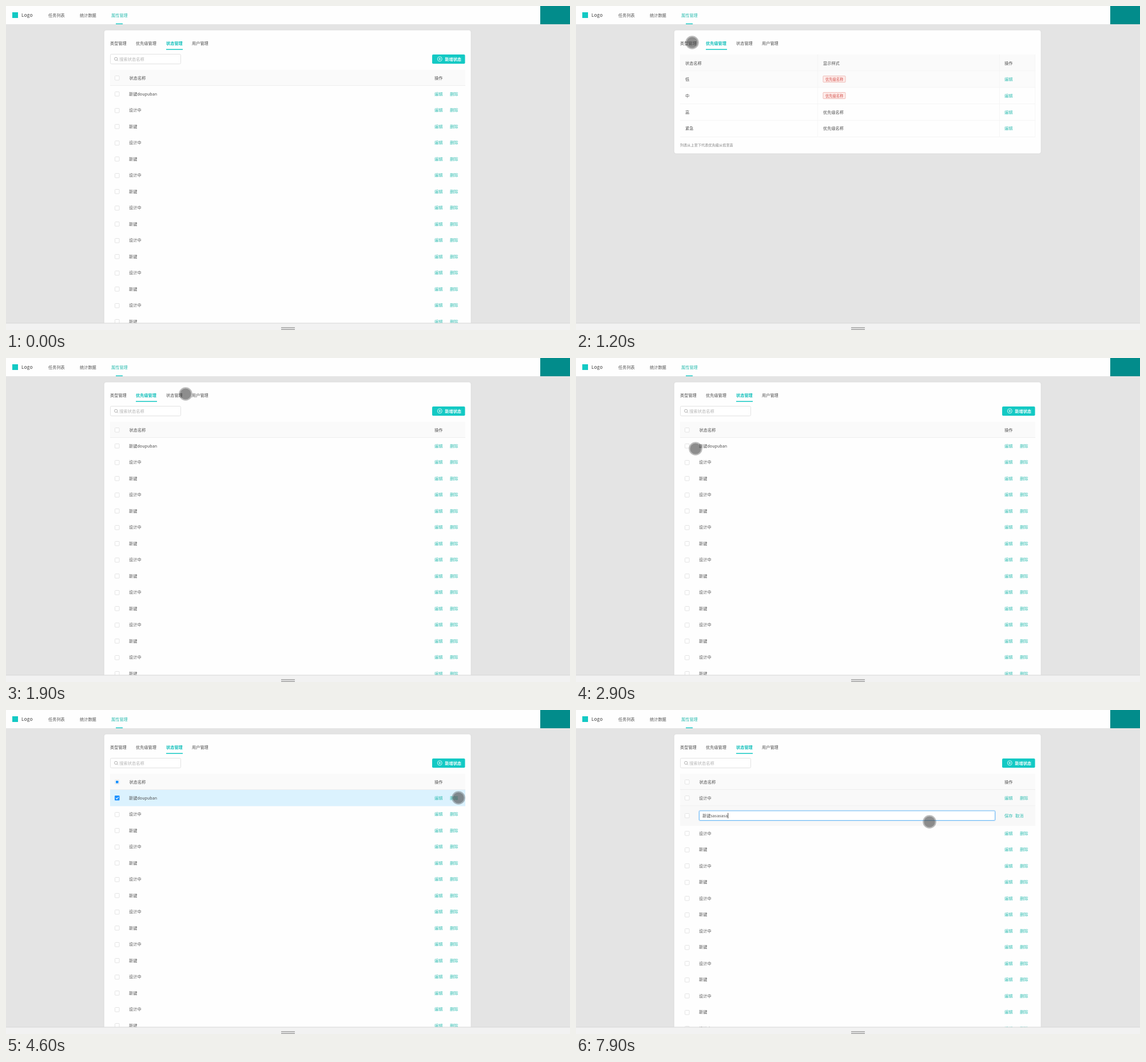
Animation of 986x568 px, one loop 8000 ms. Source, as an HTML page with a canvas:

```html
<!DOCTYPE html>
<html lang="zh-CN">
<head>
<meta charset="utf-8">
<title>属性管理</title>
<style>
  html, body { margin: 0; width: 100%; height: 100%; overflow: hidden; background: #e4e4e4; }
  canvas { display: block; width: 986px; height: 568px; }
</style>
</head>
<body>
<canvas id="stage"></canvas>
<script>
const W = 986, H = 568, LOOP = 8000, STEP = 100;
const FONT = '"Noto Sans CJK SC", "Noto Sans CJK", "Noto Sans", sans-serif';
const TEAL = '#13c9c4', LINK = '#2fbdb1', INK = '#505050', BLUE = '#1890ff';
const PITCH = 28.5;

const canvas = document.getElementById('stage');
const dpr = window.devicePixelRatio || 1;
canvas.width = W * dpr;
canvas.height = H * dpr;
const ctx = canvas.getContext('2d');

// pointer path: time, x, y
const PATH = [
  [200, 498, 61], [300, 429, 57], [400, 350, 52], [500, 284, 56], [600, 240, 60],
  [800, 240, 65], [1000, 222, 116], [1200, 203, 64], [1500, 210, 64], [1700, 272, 65],
  [1900, 314, 63], [2100, 349, 63], [2300, 335, 67], [2500, 275, 92], [2600, 232, 143],
  [2700, 212, 158], [2900, 209, 159], [3200, 196, 156], [3600, 196, 156], [3800, 205, 161],
  [4000, 500, 157], [4100, 582, 163], [4200, 703, 168], [4300, 725, 164], [4600, 791, 154],
  [4900, 788, 153], [5200, 795, 137], [5500, 795, 137], [5800, 757, 179], [6100, 758, 179],
  [6200, 692, 201], [6400, 413, 191], [6600, 413, 191], [6900, 612, 195], [7500, 612, 195],
  [7700, 618, 196]
];

const TABS = [['类型管理', 182, 29], ['优先级管理', 227, 37], ['状态管理', 280, 29], ['用户管理', 325, 29]];

const clamp = v => Math.max(0, Math.min(1, v));
const ramp = (t, from, len) => clamp((t - from) / len);
const mix = (a, b, k) => a + (b - a) * k;

function pointerAt(t) {
  if (t < PATH[0][0]) return null;
  const i = PATH.findIndex(p => p[0] > t);
  if (i < 0) return PATH[PATH.length - 1].slice(1);
  const [a, b] = [PATH[i - 1], PATH[i]];
  const k = (t - a[0]) / (b[0] - a[0]);
  return [mix(a[1], b[1], k), mix(a[2], b[2], k)];
}

function text(s, x, cy, color = INK, size = 7.2, weight = 400) {
  ctx.font = `${weight} ${size}px ${FONT}`;
  ctx.fillStyle = color;
  ctx.fillText(s, x, cy + size * 0.38);
}

function rect(x, y, w, h, color) {
  ctx.fillStyle = color;
  ctx.fillRect(x, y, w, h);
}

function box(x, y, w, h, r, fill, stroke) {
  ctx.beginPath();
  ctx.roundRect(x, y, w, h, r);
  if (fill) { ctx.fillStyle = fill; ctx.fill(); }
  if (stroke) { ctx.strokeStyle = stroke; ctx.lineWidth = 1; ctx.stroke(); }
}

function disc(x, y, r, color) {
  ctx.beginPath();
  ctx.arc(x, y, r, 0, Math.PI * 2);
  ctx.fillStyle = color;
  ctx.fill();
}

function stroke(points, color, width) {
  ctx.beginPath();
  points.forEach(([x, y], i) => i ? ctx.lineTo(x, y) : ctx.moveTo(x, y));
  ctx.strokeStyle = color;
  ctx.lineWidth = width;
  ctx.stroke();
}

function ring(x, y, r, color, width) {
  ctx.beginPath();
  ctx.arc(x, y, r, 0, Math.PI * 2);
  ctx.strokeStyle = color;
  ctx.lineWidth = width;
  ctx.stroke();
}

function checkbox(cy, state) {
  const y = Math.round(cy) - 4;
  if (state === 'on') {
    box(190, y, 8.5, 8.5, 1, BLUE);
    stroke([[192, y + 4.2], [193.7, y + 6], [196.7, y + 2.6]], '#fff', 1.1);
    return;
  }
  box(190.5, y + 0.5, 7.5, 7.5, 1, '#fff', '#e3e3e3');
  if (state === 'some') rect(192, y + 2, 4.5, 4.5, BLUE);
}

function topBar() {
  rect(0, 0, W, 32, '#fefefe');
  rect(934, 0, 52, 32, '#028c8b');
  rect(11, 11, 10, 10, TEAL);
  ctx.letterSpacing = '0.5px';
  text('Logo', 27, 16, '#333', 7.8);
  ctx.letterSpacing = '0px';
  text('任务列表', 74, 16);
  text('统计数据', 129, 16);
  text('属性管理', 184, 16, LINK);
  rect(192, 30.6, 12, 1.4, TEAL);
}

function bottomBar() {
  rect(0, 556, W, 12, '#f2f2f2');
  rect(0, 555.5, W, 1, '#d8d8d8');
  rect(481, 563.2, 24, 1.6, '#a5a5a5');
  rect(481, 566.4, 24, 1.6, '#a5a5a5');
}

function card(bottom) {
  ctx.save();
  ctx.shadowColor = 'rgba(0,0,0,.07)';
  ctx.shadowBlur = 3 * dpr;
  box(171.7, 42.5, 641, bottom - 42.5, 4, '#fefefe');
  ctx.restore();
}

function tabs(t) {
  const slide = t < 1500 ? ramp(t, 700, 200) : ramp(t, 1900, 200);
  const [from, to] = t < 1500 ? [2, 1] : [1, 2];
  const active = slide > 0 ? to : from;
  TABS.forEach(([label, x], i) =>
    text(label, x, 65, i === active ? '#10bfba' : INK, 7.2, i === active ? 700 : 400));
  const x = mix(TABS[from][1], TABS[to][1], slide);
  const w = mix(TABS[from][2], TABS[to][2], slide);
  rect(x, 75.4, w, 1.5, TEAL);
}

function toolbar() {
  box(182.5, 84.5, 123, 17, 2, '#fff', '#e2e2e2');
  ring(192.2, 92.7, 2.6, '#999', 0.8);
  stroke([[194, 94.5], [196, 96.5]], '#999', 0.8);
  text('搜索状态名称', 198.3, 93.2, '#b3b3b3', 7.25);
  box(745, 85, 57.5, 16.3, 2, TEAL);
  ring(758.3, 92.9, 4, '#fff', 0.8);
  stroke([[756.2, 92.9], [760.4, 92.9]], '#fff', 0.8);
  stroke([[758.3, 90.8], [758.3, 95]], '#fff', 0.8);
  text('新增状态', 767.3, 93.4, '#fff', 7.2, 600);
}

function statusRow(name, cy, checked) {
  checkbox(cy, checked ? 'on' : '');
  text(name, 215, cy);
  text('编辑', 749, cy, LINK);
  text('删除', 776, cy, LINK);
}

function editRow(t) {
  const focus = t >= 6500;
  const shade = Math.round(mix(253, 248, ramp(t, 6100, 200)));
  rect(182, 168, 621, 35, `rgb(${shade},${shade},${shade})`);
  rect(182, 167.5, 621, 0.8, '#f0f0f0');
  checkbox(185, '');
  if (focus) box(214.5, 176, 519, 18.5, 2, null, 'rgba(24,144,255,.18)');
  box(215.5, 176.8, 517, 16.7, 1.5, '#fff', focus ? '#74bdf5' : '#e0e0e0');
  const typed = [7000, 7100, 7300, 7400, 7600, 7700, 7800, 7900].filter(k => t >= k).length;
  const value = '新键' + 'sa'.repeat(4).slice(0, typed);
  text(value, 221, 185.2);
  if (focus) rect(221 + ctx.measureText(value).width + 0.3, 180.5, 0.9, 9.5, '#333');
  text('保存', 749, 185, LINK);
  text('取消', 768, 185, LINK);
}

function statusPage(t) {
  const removed = t >= 5600, editing = t >= 6100;
  const picked = t >= 3300 && !removed;
  toolbar();
  rect(182, 112, 621, 27.5, '#fafafa');
  rect(182, 139, 621, 0.8, '#ececec');
  checkbox(125.5, picked ? 'some' : '');
  text('状态名称', 215.5, 126);
  text('操作', 749, 126);

  if (picked) {
    ctx.globalAlpha = ramp(t, 3200, 300);
    rect(182, 140, 621, 28.5, '#dbf2fe');
    ctx.globalAlpha = 1;
  }
  if (removed) rect(182, 140, 621, 28, '#f9f9f9');

  for (let i = 0; i < 16; i++) {
    if (editing && i === 1) { editRow(t); continue; }
    const cy = 154.2 + i * PITCH + (editing && i > 1 ? 5 : 0);
    const design = (i % 2 === 1) !== removed;
    const name = design ? '设计中' : i === 0 ? '新键doupuban' : '新键';
    statusRow(name, cy, picked && i === 0);
  }
}

function priorityPage() {
  rect(182, 85, 621, 28.5, '#fafafa');
  rect(182, 114, 621, 28.5, '#fbfbfb');
  for (const y of [113.5, 142.4, 171.3, 200.2, 229.1]) rect(182, y, 621, 0.8, '#f3f3f3');
  for (const x of [422, 740, 802.3]) rect(x, 85, 0.8, 144, '#f4f4f4');
  text('状态名称', 191, 100);
  text('显示样式', 432, 100);
  text('操作', 749, 100);
  ['低', '中', '高', '紧急'].forEach((name, i) => {
    const cy = 128.2 + i * 28.8;
    text(name, 191, cy);
    if (i < 2) {
      box(432, cy - 5.5, 39, 11, 1, '#fdecea', '#f0bdb8');
      text('优先级名称', 436, cy + 0.2, '#d4504a', 6.25);
    } else {
      text('优先级名称', 432, cy);
    }
    text('编辑', 749, cy, LINK);
  });
  text('列表从上至下代表优先级从低至高', 182, 244, '#808080', 6.2);
}

function confirmBox(t) {
  const k = Math.min(ramp(t, 4600, 200), 1 - ramp(t, 5400, 200));
  if (k <= 0) return;
  ctx.save();
  ctx.globalAlpha = k;
  ctx.translate(783, 148);
  ctx.scale(mix(0.8, 1, k), mix(0.8, 1, k));
  ctx.translate(-783, -148);
  ctx.shadowColor = 'rgba(0,0,0,.15)';
  ctx.shadowBlur = 6 * dpr;
  box(740, 100, 86, 44, 2, '#fff');
  ctx.shadowColor = 'transparent';
  ctx.beginPath();
  ctx.moveTo(779, 144);
  ctx.lineTo(783, 148);
  ctx.lineTo(787, 144);
  ctx.fill();
  disc(751.5, 112, 3.6, '#faad14');
  rect(751.1, 109.8, 0.9, 2.8, '#fff');
  rect(751.1, 113.3, 0.9, 0.9, '#fff');
  text('确定删除?', 759, 112);
  box(768.5, 124.5, 22, 12, 1.5, '#fff', '#dedede');
  text('取消', 772.5, 130.5);
  box(795, 124, 23, 13, 1.5, BLUE);
  text('确定', 799.5, 130.5, '#fff');
  ctx.restore();
}

function pointer(t) {
  const p = pointerAt(t);
  if (!p) return;
  disc(p[0], p[1], 11.8, 'rgba(60,60,60,.34)');
  disc(p[0], p[1], 9.6, 'rgba(60,60,60,.36)');
}

function draw(t) {
  const priority = t >= 800 && t < 1900;
  ctx.setTransform(dpr, 0, 0, dpr, 0, 0);
  rect(0, 0, W, H, '#e4e4e4');
  topBar();
  card(priority ? 258.5 : 580);
  tabs(t);
  if (priority) priorityPage(); else statusPage(t);
  confirmBox(t);
  pointer(t);
  bottomBar();
}

function frame(now) {
  draw(Math.floor((now % LOOP) / STEP) * STEP);
  requestAnimationFrame(frame);
}
requestAnimationFrame(frame);
</script>
</body>
</html>
```
